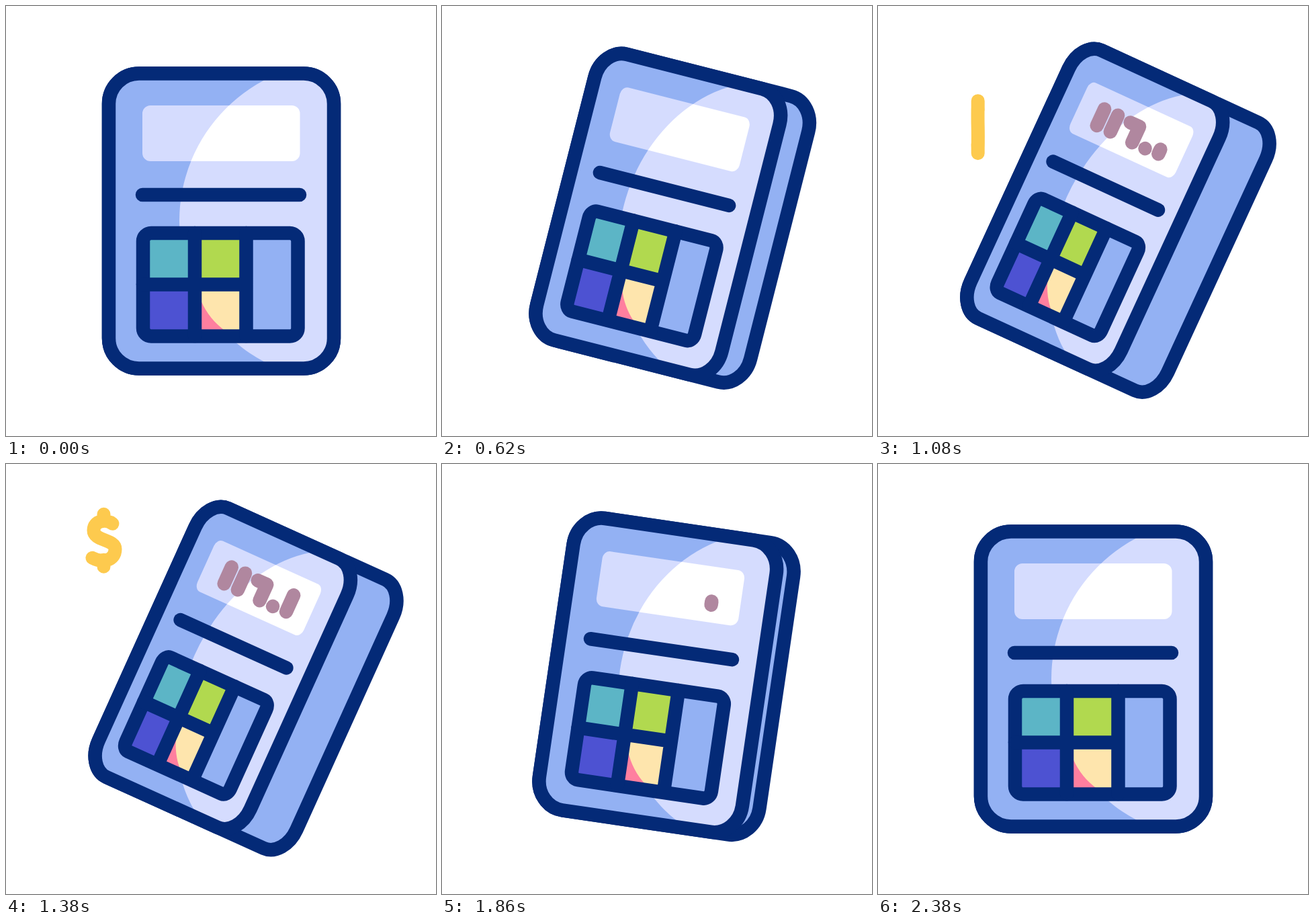
An HTML page that plays this animation: 640x640 px, repeating every 2.4 s.

```html
<!DOCTYPE html>
<html lang="en">
<head>
<meta charset="utf-8">
<title>Calculator</title>
<style>
html, body { margin: 0; width: 100%; height: 100%; overflow: hidden; background: #fff; }
svg { display: block; }
.line { fill: none; stroke: #042a77; stroke-width: 20.5; stroke-linecap: round; stroke-linejoin: round; }
.line, .digit, #coin path { vector-effect: non-scaling-stroke; }
.digit { fill: none; stroke: #b0879f; stroke-width: 20.5; stroke-linecap: round; stroke-linejoin: round; }
#coin path { fill: none; stroke: #fdca4e; stroke-width: 20; stroke-linecap: round; stroke-linejoin: round; }
</style>
</head>
<body>
<svg width="640" height="640">
  <defs>
    <clipPath id="face"><rect x="153" y="100.5" width="335" height="439" rx="45"/></clipPath>
    <clipPath id="glow"><circle cx="495" cy="320" r="237"/></clipPath>
  </defs>
  <g id="body">
    <rect id="back" class="line" x="153" y="100.5" width="335" height="439" rx="45" style="fill:#93b1f3"/>
    <rect x="153" y="100.5" width="335" height="439" rx="45" fill="#93b1f3"/>
    <g clip-path="url(#face)"><circle cx="495" cy="320" r="237" fill="#d5dcfe"/></g>
    <rect class="line" x="153" y="100.5" width="335" height="439" rx="45"/>
    <rect x="203" y="148" width="234.5" height="83" rx="12" fill="#d5dcfe"/>
    <g clip-path="url(#glow)"><rect x="203" y="148" width="234.5" height="83" rx="12" fill="#fff"/></g>
    <g id="digits"></g>
    <path class="line" d="M203 281H437"/>
    <path fill="#5cb5c6" d="M204 338h77v77h-77z"/>
    <path fill="#b1d94f" d="M281 338h77v77h-77z"/>
    <path fill="#4d52d2" d="M204 415h77v76h-77z"/>
    <path fill="#fee5ad" d="M281 415h77v76h-77z"/>
    <path fill="#ff7f9f" d="M281.5 415V397A108 108 0 0 0 338 491H281.5z"/>
    <path fill="#93b1f3" d="M358 338h77v153h-77z"/>
    <rect class="line" x="204" y="338" width="230.5" height="153.5" rx="12"/>
    <path class="line" d="M281 338V491M357.5 338V491M204 414.5H357.5"/>
  </g>
  <g id="coin">
    <path d="M13 -25C4 -32 -15 -30 -15 -15C-15 1 17 -2 17 13C17 30 -2 34 -17 26M0 -39V-29M0 29V39"/>
  </g>
</svg>
<script>
const LOOP = 2400, HALF = LOOP / 2;
const $ = id => document.getElementById(id);
const body = $('body'), back = $('back'), coin = $('coin');
const clamp = (v, a = 0, b = 1) => Math.min(b, Math.max(a, v));
const ramp = (t, start, dur) => clamp((t - start) / dur);
const smooth = x => x * x * (3 - 2 * x);

// symmetric cubic-bezier(a, 0, 1 - a, 1)
function ease(x, a = 0.675) {
  let lo = 0, hi = 1;
  for (let i = 0; i < 24; i++) {
    const m = (lo + hi) / 2, n = 1 - m;
    if (3 * a * m * n * n + 3 * (1 - a) * m * m * n + m * m * m < x) lo = m; else hi = m;
  }
  return smooth(lo);
}

// each stroke is drawn from its lower end
const strokes = [
  [[253, 205], [253, 178]],
  [[283, 205], [283, 178]],
  [[332, 206], [332, 180], [312, 180]],
  [[361, 206], [361, 205.9]],
  [[390, 205], [390, 178]]
];
const digits = strokes.map(points => {
  const el = document.createElementNS('http://www.w3.org/2000/svg', 'path');
  el.setAttribute('class', 'digit');
  $('digits').appendChild(el);
  return { el, points };
});

function partial(points, amount) {
  if (amount <= 0) return '';
  const len = i => Math.hypot(points[i][0] - points[i - 1][0], points[i][1] - points[i - 1][1]);
  let left = 0, d = 'M' + points[0];
  for (let i = 1; i < points.length; i++) left += len(i);
  left *= amount;
  for (let i = 1; i < points.length && left > 0; i++) {
    const k = Math.min(1, left / len(i)), [x, y] = points[i - 1];
    d += 'L' + [x + (points[i][0] - x) * k, y + (points[i][1] - y) * k];
    left -= len(i);
  }
  return d;
}

function drawBody(t) {
  const now = (t + 8) % LOOP;
  const p = ease(now < HALF ? now / HALF : 2 - now / HALF);
  const squeeze = 1 - 0.266 * p;
  body.setAttribute('transform',
    `translate(${320.5 + 2.3 * p} ${320 - 16.9 * p}) rotate(${24.9 * p}) scale(${squeeze} 1) translate(-320.5 -320)`);
  back.setAttribute('width', 335 + 77 * p / squeeze);
}

function drawDigits(t) {
  digits.forEach(({ el, points }, i) => {
    const shown = smooth(ramp(t, 720 + 80 * i, 120)) - smooth(ramp(t, 1615 + 80 * (i - 2), 120));
    el.setAttribute('d', partial(points, shown));
  });
}

function drawCoin(t) {
  const k = (t - 840) / 540;
  const x = 151.3 - 5.8 * k, y = 233.5 - 119.5 * k;
  const spin = Math.cos(Math.PI * (1380 - t) / 600);
  const turn = Math.abs(spin) < 0.01 ? 0.01 : spin;
  coin.setAttribute('transform', `translate(${x} ${y}) scale(${turn} 1)`);
  coin.setAttribute('opacity', ramp(t, 745, 200) * (1 - ramp(t, 1430, 160)));
}

function draw(t) {
  drawBody(t);
  drawDigits(t);
  drawCoin(t);
}

const start = performance.now();
function tick() {
  draw((performance.now() - start) % LOOP);
  requestAnimationFrame(tick);
}
draw(0);
requestAnimationFrame(tick);
</script>
</body>
</html>
```
